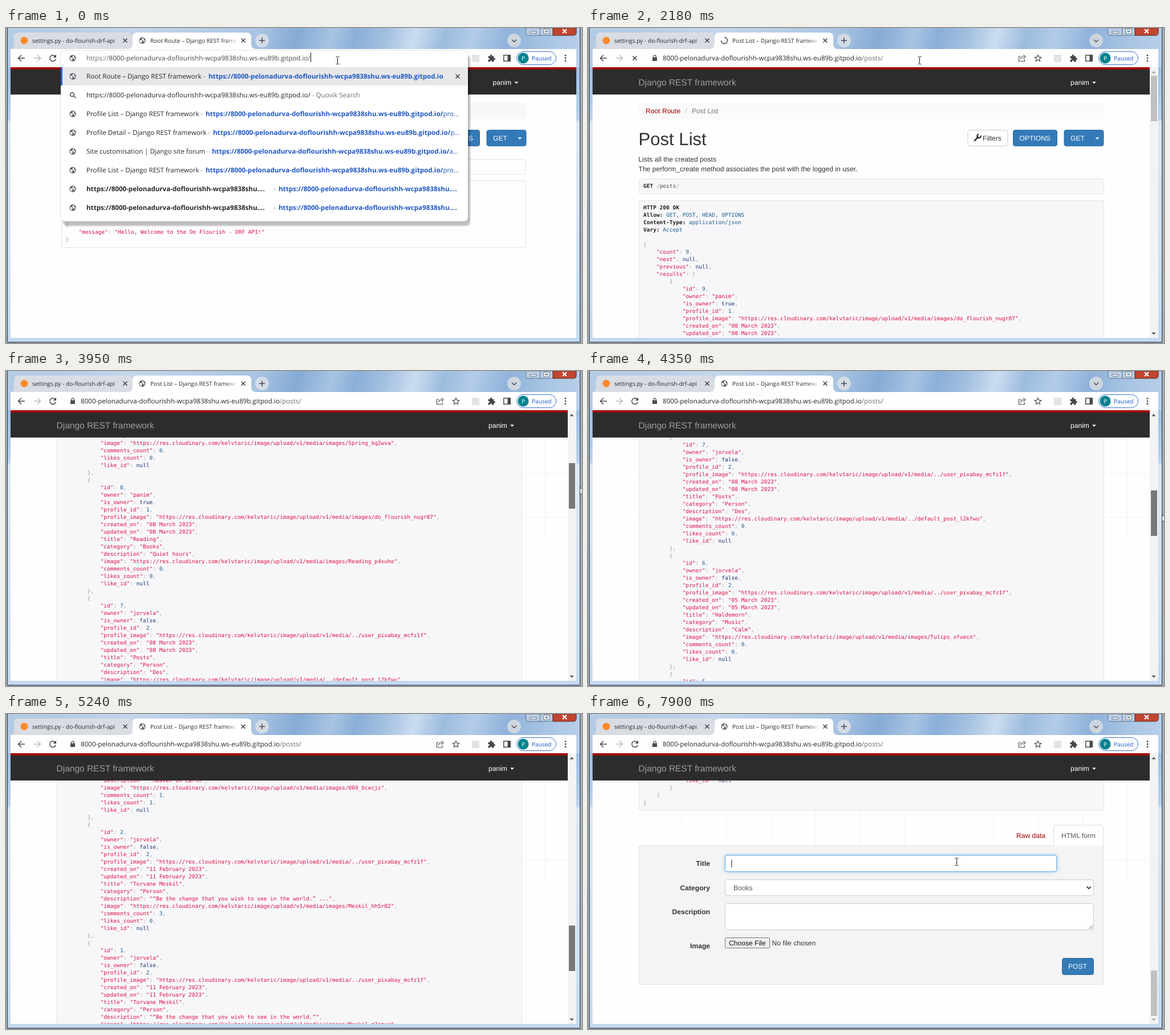
Recreate the animation shown at these times as an HTML page. Size 1010 px wide and 554 px high, loop 8 s.

```html
<!DOCTYPE html>
<html lang="en">
<head>
<meta charset="utf-8">
<title>Post List</title>
<style>
html, body { margin: 0; width: 100%; height: 100%; overflow: hidden; background: #fff; }
#stage { position: relative; width: 1010px; height: 554px; overflow: hidden; text-rendering: geometricPrecision; }
#stage > * { position: absolute; left: 0; top: 0; width: 1010px; height: 554px; }
svg { display: block; overflow: visible; white-space: pre; }
#glass {
  background:
    linear-gradient(#c3d9f0, #c3d9f0) 0 545px / 1010px 8px no-repeat,
    linear-gradient(106deg, #b4cbe6 0 8%, #c3d6ec 22%, #a9c4e2 43%, #86abd5 50%, #a8c4e3 56%, #8bafd8 60%, #a3c0e1 65%, #cbdcef 70%, #9dbcdf 75%, #b3cce8 80%, #8fb2da 86%, #a9c5e4 93%, #bcd1ea) 0 0 / 1010px 69px no-repeat,
    linear-gradient(#9dbfe3 69px, #b9d3ee 160px, #dbe8f6 166px, #cfe0f3 420px, #c3d9f0);
}
.page { clip-path: inset(117px 10px 9px 8px); background: #fefefe; }
.page > div { position: absolute; left: 0; top: 0; }
pre {
  position: absolute; left: 89px; box-sizing: border-box; width: 815.5px; margin: 0; padding: 6px 7px;
  border: 1px solid #e3e3e6; border-radius: 4px; background: #f7f7f9;
  font: 9.5px/13px "DejaVu Sans Mono", monospace; color: #48484c;
}
#root pre { background: #fdfdfd; }
pre b { color: #222; }
pre i, pre u, pre s, pre em { font-style: normal; text-decoration: none; }
pre i { color: #195f91; }
pre s { color: #d14; }
pre u { color: #1e347b; }
pre em { color: #93a1a1; }
.grid {
  left: 88px !important; top: 117px !important; width: 897px; height: 175px;
  background:
    repeating-linear-gradient(90deg, transparent 0 76.2px, #f3f3f3 76.2px 77.2px, transparent 77.2px 78.1px),
    repeating-linear-gradient(transparent 0 62px, #f3f3f3 62px 63px, transparent 63px 78px);
}
.ui { font: 11.6px "Open Sans", "Noto Sans", sans-serif; fill: #26282b; }
.ui .tab { font-size: 10.1px; }
.ui .grey { fill: #6b7075; }
.ui .bold { font-weight: 700; }
.ui .link { fill: #1f58c4; }
.web { font: 12.1px "Liberation Sans", Arial, sans-serif; fill: #333; }
.web .h1 { font-size: 31.1px; }
.web .lab { font-weight: 700; text-anchor: end; }
.red { fill: #a30000; }
.btn { fill: #337ab7; stroke: #2e6da4; }
.box { fill: #fff; stroke: #ccc; }
.line { fill: none; stroke: #474a4e; stroke-width: 1.5; }
.white { fill: #fff !important; }
#panel { filter: drop-shadow(4px 8px 1px #0003) drop-shadow(0 0 1px #0004); }
#glow { filter: drop-shadow(0 0 3px #66afe9aa); }
</style>
</head>
<body>
<div id="stage">
  <div id="glass"></div>

  <svg class="ui">
    <defs>
      <g id="globe"><circle r="5.7" fill="#5f6368"/><path d="M-4.6 -1.2L-1 -.8 .4 1.2 -1.2 2.2 -1 4.6Q-4.6 3.4 -4.6 -1.2ZM0 -4.6L3 -3.6 2 -1.6 4.6 .2 3.6 2.8 1.6 .4 -.6 -1.2Z" fill="#fff"/></g>
      <path id="cross" d="M-3.5 -3.5L3.5 3.5M3.5 -3.5L-3.5 3.5" stroke="#3c4043" stroke-width="1.5"/>
      <linearGradient id="fade" x1="0" x2="1"><stop offset="0" stop-color="#fff" stop-opacity="0"/><stop offset="1" stop-color="#fff"/></linearGradient>
    </defs>
    <path d="M2.5 0V552.5H1006.5V0" fill="none" stroke="#22394c"/>
    <path d="M0 0H2V554H0ZM1007 0H1010V554H1007ZM0 553H1010V554H0Z" fill="#a9adb2"/>
    <path d="M8 37H1000V545H8Z" fill="#fefefe"/>

    <path d="M8 37Q14 36 14 30V16Q14 8 22 8H214Q222 8 222 16V37Z" fill="#d9dde3"/>
    <path d="M214 37Q222 36 222 29V16Q222 8 230 8H422Q430 8 430 16V29Q430 36 438 37Z" fill="#fff"/>
    <circle cx="32" cy="22" r="6.5" fill="#ff8a2a"/>
    <text class="tab" x="46" y="26">settings.py - do-flourish-drf-api</text>
    <use href="#cross" x="209" y="22"/>
    <use id="favicon" href="#globe" x="239" y="22"/>
    <path id="spinner" d="M0 -5.5A5.5 5.5 0 1 1 -5.5 0" fill="none" stroke="#5f6368" stroke-width="1.8"/>
    <svg x="253" y="8" width="151" height="28" style="overflow:hidden"><text id="title" class="tab" y="18"></text></svg>
    <path d="M384 12H406V34H384Z" fill="url(#fade)"/>
    <use href="#cross" x="416" y="22"/>
    <circle cx="449" cy="22" r="12" fill="#d3dce6"/>
    <path class="line" d="M449 17V27M444 22H454"/>
    <circle cx="891" cy="22" r="12" fill="#cdd6e0"/>
    <path class="line" d="M887 20.5l4 4 4-4"/>

    <path d="M911.5 0H959V13H916Q911.5 13 911.5 8Z" fill="#b9cde4" stroke="#5c718a"/>
    <path d="M959 0H1000V8Q1000 13 995 13H959Z" fill="#c2452f" stroke="#5b2a24"/>
    <path d="M936.5 0V13" stroke="#5c718a"/>
    <path d="M919 6H930V9H919ZM943 2H953V10H943ZM946 5V7H950V5Z" fill="#fff" fill-rule="evenodd" stroke="#4d5a68" stroke-width=".8"/>
    <path d="M976 2l7 7M983 2l-7 7" stroke="#fff" stroke-width="2.2"/>

    <path class="line" d="M33 53H22M27 47.5L21.5 53 27 58.5"/>
    <path class="line" d="M49 53H60M55 47.5L60.5 53 55 58.5" style="stroke:#b9bbbe"/>
    <g id="reload"><path class="line" d="M86.5 50A5.3 5.3 0 1 0 87.3 54.5"/><path d="M88 46.5V52H82.5Z" fill="#474a4e"/></g>
    <use id="stop" href="#cross" x="82" y="53"/>
    <g id="address">
      <path d="M113 51.5H121V58H113Z" fill="#4a4d51"/><path class="line" d="M114.8 52V50A2.2 2.2 0 0 1 119.2 50V52" style="stroke-width:1.2"/>
      <text id="site" x="131" y="57"></text>
      <path class="line" style="stroke-width:1.1" d="M759 50H755.5V58.5H765.5V55M758.5 55.5Q759 50.5 764 50.5M763.5 47.5L767 50.5 763.5 53.5"/>
      <path class="line" style="stroke-width:1.2" d="M789 47.5l1.7 3.7 4 .4-3 2.7.9 4-3.6-2.1-3.6 2.1.9-4-3-2.7 4-.4Z"/>
    </g>
    <path d="M817 47H830V60H817Z" fill="#e3e3e5"/>
    <path d="M845.5 49.5H849Q848.5 46.5 850.5 46.5T852 49.5H855.5V53Q858 52.5 858 54.5T855.5 56V59.5H852Q852 57 850.3 57T848.8 59.5H845.5V56Q848 56 848 54.3T845.5 53Z" fill="#44474b"/>
    <path class="line" d="M872.8 47.8H884.2V58.2H872.8Z"/><path d="M879.5 48H884.5V58H879.5Z" fill="#44474b"/>
    <rect x="895.5" y="41.5" width="69" height="23" rx="11.5" fill="#fcfdff" stroke="#3f76cf"/>
    <circle cx="907" cy="53" r="9.5" fill="#00838f"/>
    <text class="white" x="907" y="56.6" text-anchor="middle" style="font-size:10px">P</text>
    <text class="tab link" x="922" y="56.5">Paused</text>
    <path d="M979.7 47h2.6v2.6h-2.6ZM979.7 51.7h2.6v2.6h-2.6ZM979.7 56.4h2.6V59h-2.6Z" fill="#44474b"/>

    <path d="M8 73H1000V117H8Z" fill="#2c2c2c"/><path class="red" d="M8 69H1000V73H8Z"/>
    <g id="nav" class="web">
      <text x="88.5" y="100.5" style="font-size:15.5px;fill:#9d9d9d">Django REST framework</text>
      <text class="white" x="846" y="99.5">panim</text><path class="white" d="M884 94.5H891L887.5 98Z"/>
    </g>
  </svg>

  <div id="root" class="page"><div style="left:7.5px">
    <svg class="web">
      <rect x="89" y="131" width="815" height="29" rx="4" fill="#f8f8f8"/>
      <text x="101" y="150" style="fill:#777">Root Route</text>
      <text class="h1" x="88.5" y="206">Root Route</text>
      <g class="buttons"></g>
    </svg>
    <pre style="top:231px"><b>GET</b> <em>/</em></pre>
    <pre style="top:268px;height:119px"><b>HTTP 200 OK</b>
<b>Allow:</b> <i>OPTIONS, GET</i>
<b>Content-Type:</b> <i>application/json</i>
<b>Vary:</b> <i>Accept</i>

<em>{</em>
    <s>"message"</s><em>:</em> <s>"Hello, Welcome to the Do Flourish - DRF API!"</s>
<em>}</em></pre>
  </div></div>

  <div id="list" class="page"><div class="grid"></div><div id="scroll">
    <svg class="web">
      <rect x="89" y="131" width="815" height="29" rx="4" fill="#fafafa"/>
      <text x="101" y="150"><tspan class="red">Root Route</tspan><tspan x="170.5" fill="#bbb">/</tspan><tspan x="182" fill="#777">Post List</tspan></text>
      <text class="h1" x="88.5" y="206">Post List</text>
      <text x="88.5" y="235">Lists all the created posts</text>
      <text x="88.5" y="252">The perform_create method associates the post with the logged in user.</text>
      <rect class="box" x="666" y="179.5" width="70" height="28" rx="3.5"/>
      <path d="M678 198L684 192" stroke="#333" stroke-width="2.6" stroke-linecap="round"/>
      <path d="M688.5 189A3.2 3.2 0 1 1 685 187" fill="none" stroke="#333" stroke-width="2.4"/>
      <text x="692" y="198">Filters</text>
      <g class="buttons"></g>
      <g transform="translate(0 2175)">
        <rect x="89" y="231.5" width="815" height="244" rx="4" fill="#f4f4f4" stroke="#e1e1e1"/>
        <path d="M816.5 232V199Q816.5 195.5 820 195.5H900Q903.5 195.5 903.5 199V232" fill="#fefefe" stroke="#ddd"/>
        <text class="red" x="751" y="217.5">Raw data</text><text x="830" y="217.5" style="fill:#555">HTML form</text>
        <text class="lab" x="214" y="267">Title</text><text class="lab" x="214" y="310">Category</text>
        <text class="lab" x="214" y="352">Description</text><text class="lab" x="214" y="412">Image</text>
        <rect class="box" x="240.5" y="248.5" width="581" height="28.5" rx="3.5"/>
        <g id="focus"><rect id="glow" x="240.5" y="248.5" width="581" height="28.5" rx="3.5" fill="#fff" stroke="#66afe9"/></g>
        <path id="caret" d="M252 256V270" stroke="#222"/>
        <rect class="box" x="240.5" y="291.5" width="646" height="28" rx="3.5"/>
        <text x="255" y="310" style="fill:#555">Books</text>
        <path class="line" d="M874.5 303.5l3.7 3.7 3.7-3.7" style="stroke-width:2"/>
        <rect class="box" x="240.5" y="333.5" width="646" height="46" rx="3.5"/>
        <path d="M878 378l7-7M882 378l3-3" stroke="#777"/>
        <rect x="240.5" y="393.5" width="78" height="18" rx="2" fill="#efefef" stroke="#767676"/>
        <text x="247" y="406.5" style="fill:#111">Choose File</text><text x="322.5" y="406.5">No file chosen</text>
        <rect class="btn" x="831.5" y="429.5" width="55" height="29" rx="3.5"/>
        <text class="white" x="842" y="448">POST</text>
      </g>
    </svg>
    <pre style="top:265px"><b>GET</b> <em>/</em>posts<em>/</em></pre>
    <pre id="json" style="top:303px"></pre>
  </div></div>

  <svg id="bar">
    <path d="M985 69H1000V545H985Z" fill="#f3f3f3"/>
    <path id="up" d="M988.5 79.5H995.5L992 75.5Z"/><path id="down" d="M988.5 535.5H995.5L992 539.5Z"/>
    <rect id="thumb" x="987" width="11" height="80"/>
  </svg>

  <svg id="omnibox" class="ui">
    <path id="panel" fill="#fff"/>
    <use href="#globe" x="117" y="53"/>
    <text id="typed" x="141" y="57"></text>
    <path id="bar-caret" d="M0 43V60" stroke="#111"/>
    <g id="rows"></g>
  </svg>

  <svg>
    <path id="arrow" d="M.5 .5V14L3.6 11 5.8 16.2 8 15.3 5.8 10.2H10Z" fill="#fff" stroke="#111" stroke-width=".9"/>
    <path id="beam" d="M-3 -6.5H-1L0 -5.5 1 -6.5H3M0 -5.5V5.5M-3 6.5H-1L0 5.5 1 6.5H3" fill="none" stroke="#111"/>
  </svg>
</div>

<script>
const LOOP = 8000, MAX_SCROLL = 2175;
const $ = id => document.getElementById(id);
const show = (id, on) => $(id).style.display = on ? '' : 'none';
const move = (id, x, y) => $(id).setAttribute('transform', `translate(${x} ${y})`);

const host = '8000-pelonadurva-doflourishh-wcpa9838shu.ws-eu89b.gitpod.io';
const url = 'https://' + host;
const shortUrl = url.slice(0, url.indexOf('.')) + '....';

// Page content
document.querySelectorAll('.buttons').forEach(g => g.innerHTML = `
  <rect class="btn" x="745.5" y="179.5" width="77" height="28" rx="3.5"/><text class="white" x="756.5" y="198">OPTIONS</text>
  <rect class="btn" x="835" y="179.5" width="69" height="28" rx="3.5"/><path d="M881.5 180V207" stroke="#2e6da4"/>
  <text class="white" x="846" y="198">GET</text><path class="white" d="M889.5 192.5H896.5L893 196Z"/>`);

const media = 'https://res.cloudinary.com/kelvtaric/image/upload/v1/media/';
const quote = '“Be the change that you wish to see in the world.”';
const posts = [
  ['panim', '08 March 2023', 'Spring', 'Nature', 'Fresh', 'images/Spring_kq2wva', 0, 0],
  ['panim', '08 March 2023', 'Reading', 'Books', 'Quiet hours', 'images/Reading_p4xuhe', 0, 0],
  ['jorvela', '08 March 2023', 'Posts', 'Person', 'Des', '../default_post_l2kfwu', 0, 0],
  ['jorvela', '05 March 2023', 'Haldemorn', 'Music', 'Calm', 'images/Tulips_xfuecn', 0, 0],
  ['jorvela', '05 March 2023', 'Garden', 'Nature', 'Green', 'images/Garden_w8rtya', 0, 0],
  ['jorvela', '12 February 2023', 'Morning', 'Nature', 'Sunrise', 'images/004_dvqpsm', 1, 0],
  ['jorvela', '11 February 2023', 'Valley', 'Places', 'Heaven on Earth', 'images/009_bcecjz', 1, 1],
  ['jorvela', '11 February 2023', 'Torvane Meskil', 'Person', quote + ' ...', 'images/Meskil_hh5r82', 3, 0],
  ['jorvela', '11 February 2023', 'Torvane Meskil', 'Person', quote, 'images/Meskil_m7epyo', 0, 0],
];
const results = posts.map(([owner, date, title, category, description, image, comments, likes], i) => {
  const own = owner === 'panim';
  return {
    id: 9 - i, owner, is_owner: own, profile_id: own ? 1 : 2,
    profile_image: media + (own ? 'images/do_flourish_nugr87' : '../user_pixabay_mcfz1f'),
    created_on: date, updated_on: date, title, category, description,
    image: media + image, comments_count: comments, likes_count: likes, like_id: null,
  };
});
const paint = text => text.replace(/("[^"\n]*")|\b(true|false|null)\b|\b(\d+)\b|[{}\[\],:]+/g,
  (m, str, word, num) => { const tag = str ? 's' : word ? 'u' : num ? 'i' : 'em'; return `<${tag}>${m}</${tag}>`; });
$('json').innerHTML = `<b>HTTP 200 OK</b>
<b>Allow:</b> <i>GET, POST, HEAD, OPTIONS</i>
<b>Content-Type:</b> <i>application/json</i>
<b>Vary:</b> <i>Accept</i>

` + paint(JSON.stringify({ count: 9, next: null, previous: null, results }, null, 4));

// Address suggestions: [title, x of the link, bold part, plain part]
const drf = name => name + ' – Django REST framework';
const profiles = [drf('Profile List'), 350, url + '/', 'pro...'];
const detail = [drf('Profile Detail'), 363, url + '/', 'p...'];
const postList = [drf('Post List'), 338, url + '/...', ''];
const plain = [shortUrl, 478, shortUrl, ''];
const suggestions = n =>
  n === 0 ? [[drf('Root Route'), 355, url, ''], null, profiles, detail,
    ['Site customisation | Django site forum', 361, url + '/', 'a...'], profiles, plain, plain]
  : n === 1 ? [profiles, null, postList, detail, profiles, plain, plain]
  : [postList, null];

function row(item, i, path) {
  const y = 85 + 33 * i, base = y + 4;
  if (!item) return `<circle class="line" cx="116" cy="${y - 1}" r="3.4"/><path class="line" d="M118.5 ${y + 1.5}l4 4"/>
    <text x="141" y="${base}">${url + path}<tspan class="grey"> - Quovik Search</tspan></text>`;
  const [title, x, bold, rest] = item;
  return (i ? '' : '<path d="M96 69H810V101H96Z" fill="#e8e8ea"/><path d="M96 69H99V101H96Z" fill="#2a66cf"/><use href="#cross" x="792" y="85"/>') +
    `<use href="#globe" x="117" y="${y}"/>
    <text x="141" y="${base}" class="${item === plain ? 'bold' : ''}">${title}</text>
    <text class="grey" x="${x - 9}" y="${base}">-</text>
    <text class="link" x="${x}" y="${base}"><tspan class="bold">${bold}</tspan>${rest}</text>`;
}

let shown = -1;
function fillOmnibox(n) {
  if (n === shown) return;
  shown = n;
  const path = '/' + 'posts'.slice(0, n), items = suggestions(n), end = 76 + 33 * items.length;
  $('panel').setAttribute('d', `M96 48Q96 40 104 40H802Q810 40 810 48V${end - 8}Q810 ${end} 802 ${end}H104Q96 ${end} 96 ${end - 8}Z`);
  $('typed').innerHTML = `<tspan class="grey">https://</tspan><tspan fill="#45494d">${host}</tspan><tspan class="grey">${path}</tspan>`;
  $('rows').innerHTML = items.map((item, i) => row(item, i, path)).join('');
  move('bar-caret', Math.round(141 + $('typed').getComputedTextLength()) + .5, 0);
}
$('site').innerHTML = `${host}<tspan class="grey">/posts/</tspan>`;

// Timing
const keys = [650, 900, 1140, 1320, 1500];
const drags = [[3336, 4030, 9, 520], [4220, 4410, 4, 820], [4620, 4840, 4, 1420], [5160, 5370, 4, 1994], [5680, 5778, 2, MAX_SCROLL]];
const pointer = [
  [0, 581, 57, 'beam'], [2870, 620, 62], [2930, 760, 90], [2990, 900, 118], [3050, 988, 126],
  [4840, 1020, 380], [6850, 940, 432], [6905, 850, 410], [6960, 777, 391],
  [7190, 742, 354], [7250, 705, 318], [7310, 672, 286], [7370, 647, 260, 'beam'], [7550, 646, 260, 'beam'],
];

function scrollAt(t) {
  let pos = 0;
  for (const [start, end, steps, to] of drags) {
    if (t < start) break;
    const done = Math.min(steps, 1 + Math.floor((t - start) / (end - start) * (steps - 1)));
    pos += (to - pos) * done / steps;
  }
  return pos;
}

function draw(t) {
  const editing = t < 1890, loaded = t >= 2130, loading = !editing && t < 2310;
  show('omnibox', editing);
  show('address', !editing);
  if (editing) {
    fillOmnibox(keys.filter(k => t >= k).length);
    show('bar-caret', t < 380 || t >= 650);
  }
  show('root', !loaded);
  show('list', loaded);
  show('bar', loaded);
  show('spinner', loading);
  show('favicon', !loading);
  show('stop', loading);
  show('reload', !loading);
  $('spinner').setAttribute('transform', `translate(239 22) rotate(${Math.floor(t / 60) * 40})`);
  $('title').textContent = drf(loaded ? 'Post List' : 'Root Route');
  move('nav', loaded ? 0 : 7.5, 0);

  const pos = scrollAt(t), top = 84 + pos / MAX_SCROLL * 367;
  $('scroll').style.transform = `translateY(${-Math.round(pos)}px)`;
  document.querySelector('.grid').style.opacity = pos ? 1 : 0;
  $('thumb').setAttribute('y', Math.round(top));
  $('thumb').setAttribute('fill', t < 3050 || t >= 6580 ? '#c1c1c1' : t < 3330 ? '#a8a8a8' : '#787878');
  $('up').setAttribute('fill', pos ? '#505050' : '#a3a3a3');
  $('down').setAttribute('fill', pos < MAX_SCROLL ? '#505050' : '#a3a3a3');

  let [, x, y, kind = 'arrow'] = pointer.filter(p => t >= p[0]).pop();
  if (t >= 3250 && t < 4840) {
    x = Math.min(1006, 988 + pos / 25);
    y = top + 42;
  }
  show('arrow', kind === 'arrow');
  show('beam', kind === 'beam');
  move(kind, Math.round(x), Math.round(y));
  if (kind === 'beam') move(kind, x + .5, y);

  $('focus').style.opacity = t < 7790 ? 0 : Math.min(1, (1 + Math.floor((t - 7790) / 55)) / 3);
  show('caret', t >= 7790);
}

const start = performance.now();
function tick(now) {
  draw(Math.max(0, now - start) % LOOP);
  requestAnimationFrame(tick);
}
tick(start);
</script>
</body>
</html>
```
